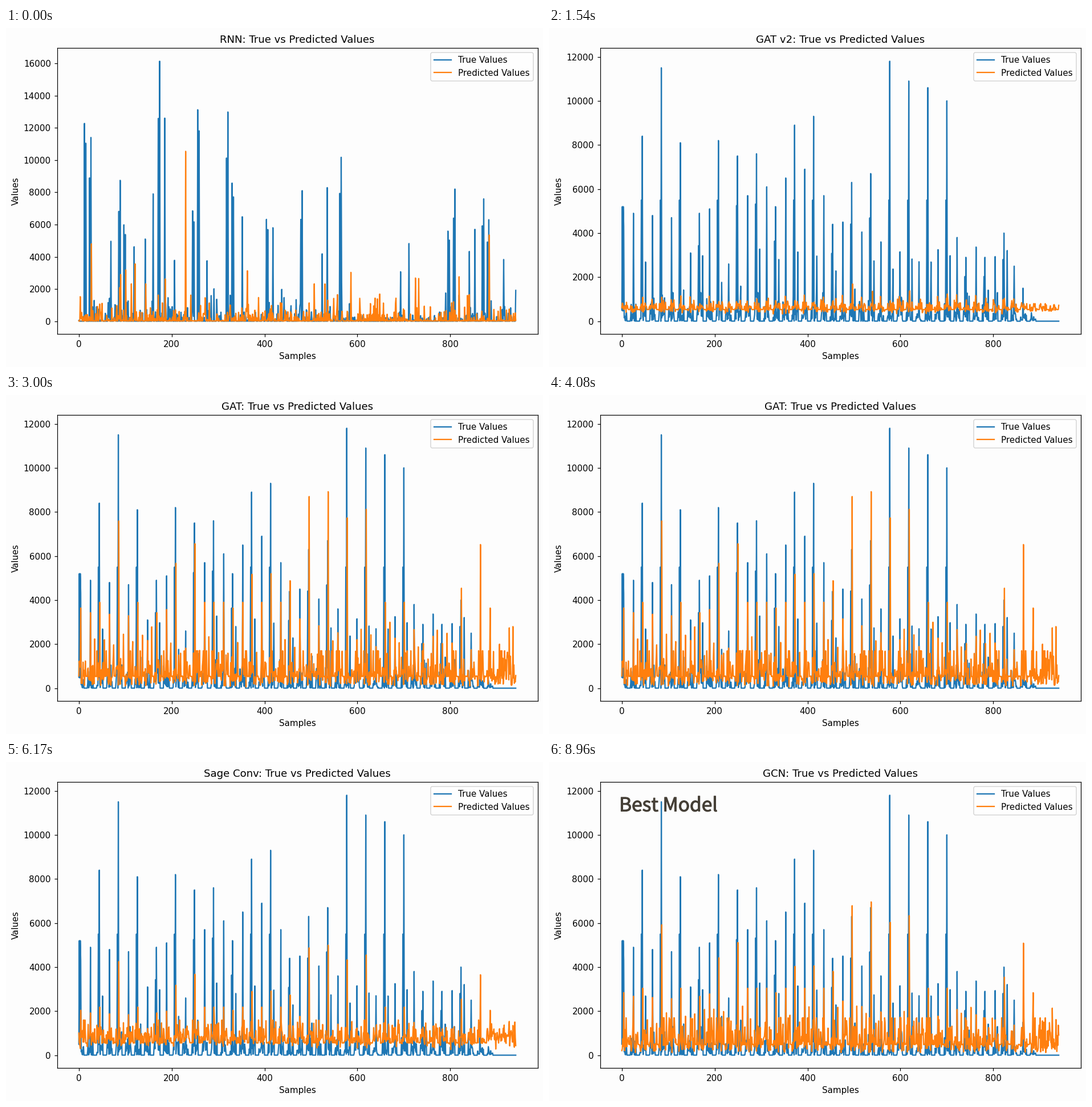
Animation of 942 by 595 pixels, one loop 9000 ms. Source, as a matplotlib script:

```python
import numpy as np
import matplotlib.pyplot as plt
from matplotlib import patheffects
from matplotlib.animation import FuncAnimation

W, H, DPI = 942, 595, 108.7
LOOP, FRAMES = 9000, 36
BG, INK = "#fdfdfd", "#453f36"
N, DAY = 942, 20.49
s = np.arange(N)


def sparse(seed, share, scale, top, floor):
    """Mostly flat signal with short random spikes."""
    rng = np.random.default_rng(seed)
    spikes = np.clip(rng.exponential(scale, N), 0, top)
    return np.where(rng.random(N) < share, spikes, 0) + floor


def add_peaks(y, peaks, lag=0, ratio=1):
    """Set peaks, each with an optional smaller companion nearby."""
    for x, h in peaks.items():
        y[x + lag] = h * ratio
        y[x] = h


def recurrent():
    """Irregular bursts; the forecast stays near zero."""
    actual = sparse(3, 0.33, 420, 2400, 5)
    actual[585:790] *= 0.4
    rising = {26: 11400, 89: 8740, 174: 16130, 321: 12980, 481: 8100,
              565: 10170, 810: 8200, 872: 7590, 883: 6300}
    falling = {12: 12270, 97: 5980, 245: 6850, 256: 13120, 330: 8570,
               404: 6320, 795: 5590}
    single = {69: 4960, 119: 4620, 143: 5100, 160: 7900, 185: 12600,
              206: 3780, 276: 3750, 352: 6480, 418: 5800, 524: 4180,
              535: 8290, 693: 3070, 711: 4820, 841: 4330, 853: 5700,
              915: 3830}
    add_peaks(actual, rising, -3, 0.78)
    add_peaks(actual, falling, 3, 0.9)
    add_peaks(actual, single)

    guess = sparse(8, 0.4, 480, 2300, 20)
    add_peaks(guess, {27: 4800, 90: 2900, 101: 3180, 121: 3560, 186: 2620,
                      230: 10540, 363: 3130, 586: 3030, 725: 2680,
                      732: 2650, 819: 2760, 884: 5350})
    return actual, guess


def day_heights():
    """Every other day is tall; the days between follow a slow curve."""
    tall = [52, 84, 115, 81, 49, 82, 75, 76, 52, 89, 93, 44, 63, 67, 118,
            109, 106, 100, 29, 29, 40, 15]
    k = np.arange(43)
    h = np.interp(k, [1, 5, 7, 9, 11, 13, 19, 23, 31, 35, 41],
                  [49, 47, 31, 51, 26, 57, 69, 45, 27, 38, 25])
    h[::2] = tall
    return 100 * h


def daily(heights):
    """Daily peaks, lead-in spikes and low activity with flat nights."""
    rng = np.random.default_rng(5)
    phase = (s - 3) % DAY
    awake = (phase < 7.5) | (phase > 15.5)
    y = np.where(awake, np.clip(rng.exponential(360, N), 0, 1300), 5)
    y[846:] *= 0.3
    y[893:] = 3
    y[0] = 500
    for k, h in enumerate(heights):
        even = k % 2 == 0
        x = round((3 if even else 4.5) + DAY * k)
        y[x] = h
        if even and 0 < k < 42:
            y[x - 2] = min(0.7 * h, 5500)
            y[x + 7] = rng.uniform(1000, 3500)
    y[1], y[4] = 5200, 4320
    return y


def forecast(seed, gain, flat, mid, spread, low, top, floor=0):
    """Noisy band with short flat spells and damped daily peaks."""
    rng = np.random.default_rng(seed)
    y = np.clip(mid * np.exp(rng.normal(0, spread, N)), low, top)
    phase = (s - 4) % DAY
    still = (phase > 9) & (phase < 14) & (s < 885)
    y = np.where(still, flat + rng.normal(0, 8, N), y)
    # Strongest days, numbered from the start
    strong = {4: 7590, 10: 5670, 12: 6560, 18: 5170, 20: 5200, 22: 4880,
              24: 8700, 26: 8920, 28: 7730, 30: 8120, 40: 4540, 42: 6520,
              43: 3640, 44: 2000, 45: 2740}
    usual = dict(enumerate(np.minimum(0.7 * heights, 3900)))
    for k, h in {**usual, **strong}.items():
        x = round(4 + DAY * k + 0.5 * (k % 2))
        y[x] = max(gain * h, floor)
        if k < 40:
            y[x - 11] = max(y[x - 11], gain * rng.uniform(800, 3000))
    return y


def steady():
    """Nearly constant forecast."""
    rng = np.random.default_rng(11)
    y = np.clip(610 * np.exp(rng.normal(0, 0.22, N)), 280, 1050)
    night = (s - 4) % DAY
    y = np.where((night > 9) & (night < 14), 530, y)
    y[870:] = np.clip(y[870:], 460, 800)
    for k in range(2, 42):
        y[round(4 + DAY * k)] = rng.uniform(750, 1250)
    add_peaks(y, {497: 1690, 540: 1360, 620: 1380})
    return y


rnn_true, rnn_pred = recurrent()
heights = day_heights()
true = daily(heights)
slides = [
    ("RNN", rnn_true, rnn_pred),
    ("GAT v2", true, steady()),
    ("GAT", true, forecast(12, 1, 540, 560, 0.75, 50, 1700)),
    ("ChebNet", true, forecast(13, 0.85, 500, 680, 0.65, 90, 1800)),
    ("Sage Conv", true, forecast(14, 0.56, 560, 800, 0.33, 250, 1600, 1200)),
    ("GCN", true, forecast(15, 0.78, 490, 570, 0.7, 120, 1700)),
]

plt.rcParams["font.family"] = "DejaVu Sans"
fig = plt.figure(figsize=((W + 0.01) / DPI, (H + 0.01) / DPI), dpi=DPI,
                 facecolor=BG)
ax = fig.add_axes([89.5 / W, 1 - 537.5 / H, 843 / W, 502 / H], facecolor=BG)
true_line, = ax.plot(s, rnn_true, label="True Values")
pred_line, = ax.plot(s, rnn_pred, label="Predicted Values")
ax.set_xlim(-0.05 * (N - 1), 1.05 * (N - 1))
ax.set_xticks(range(0, 801, 200))
ax.set_xlabel("Samples")
ax.set_ylabel("Values")
ax.legend(loc="upper right")
title = ax.set_title("")
best = fig.text(123 / W, 1 - 86.5 / H, "Best Model", color=INK,
                family="Noto Sans CJK JP", size=22.2, va="baseline")
best.set_path_effects([patheffects.withStroke(linewidth=0.7, foreground=INK)])


def update(i):
    k = i * len(slides) // FRAMES
    name, actual, guess = slides[k]
    top = actual.max()
    true_line.set_ydata(actual)
    pred_line.set_ydata(guess)
    ax.set_yticks(range(0, int(top * 1.05), 2000))
    ax.set_ylim(-0.05 * top, 1.05 * top)
    title.set_text(f"{name}: True vs Predicted Values")
    best.set_visible(k == len(slides) - 1)
    return true_line, pred_line, title, best


anim = FuncAnimation(fig, update, frames=FRAMES, interval=LOOP / FRAMES,
                     repeat=True, repeat_delay=0, blit=False)
plt.show()
```
